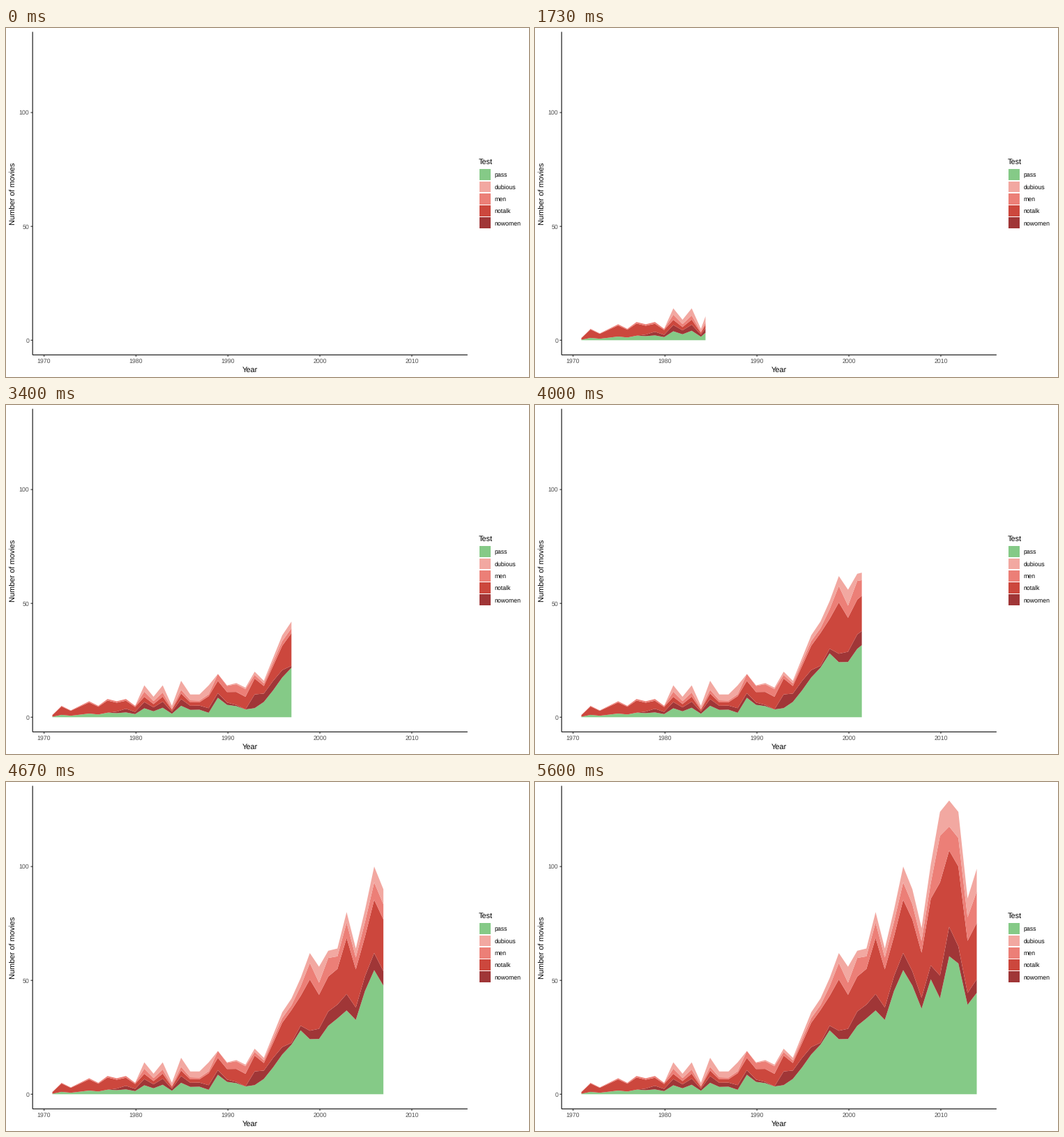
Recreate the animation shown at these times as a matplotlib script. Size 750 by 500 pixels, loop 6670 ms.

```python
import numpy as np
import matplotlib.pyplot as plt
from matplotlib.animation import FuncAnimation
from matplotlib.patches import Polygon, Rectangle

plt.rcParams["font.family"] = "Liberation Sans"
plt.rcParams["text.hinting"] = "none"

W, H, DPI = 750, 500, 100
PX = 72 / DPI                      # points per pixel
STEPS, REVEAL, LOOP = 100, 84, 6670
SUB = 4                            # drawn frames per reveal step

# Panel geometry in pixels
LEFT, RIGHT, TOP, BOTTOM = 38.15, 661.85, 5.5, 468.3
X0, YEAR = 66.5, 13.186            # first data point, width of a year
Y0, UNIT = 447.3, 3.2617           # baseline, height of one movie

COLORS = {"pass": "#85ca87", "dubious": "#f2a8a1", "men": "#ec7f77",
          "notalk": "#cc473d", "nowomen": "#a03637"}
STACK = ["pass", "nowomen", "notalk", "men", "dubious"]

# Movies per year; the bands are shares of it that drift between key years
total = np.array([1, 5, 3, 5, 7, 5, 8, 7, 8, 5, 14, 9, 14, 5, 16, 10, 10, 14,
                  19, 14, 15, 13, 20, 16, 26, 36, 42, 51, 62, 56, 63, 64, 80,
                  64, 81, 100, 90, 73, 101, 124, 129, 124, 86, 99])
years = np.arange(len(total))


def share(*keys):
    return np.interp(years, *zip(*keys))


passing = share((0, .2), (16, .33), (17, .14), (18, .45), (22, .2), (23, .42),
                (27, .55), (28, .39), (31, .52), (32, .46), (34, .56),
                (38, .5), (39, .34), (40, .47), (43, .45))
no_women = share((6, 0), (8, .2), (16, .18), (21, 0), (22, .3), (26, .02),
                 (30, .1), (38, .06), (40, .1), (41, .06))
up_to_notalk = share((0, .95), (9, .9), (10, .64), (17, .66), (18, .84),
                     (21, .69), (22, .85), (26, .88), (29, .78), (31, .86),
                     (38, .85), (39, .75), (40, .83), (43, .76))
up_to_men = share((0, 1), (9, 1), (10, .8), (17, .72), (18, 1), (22, .93),
                  (28, .93), (29, .875), (30, .95), (43, .9))
levels = [0, passing, passing + no_women, up_to_notalk, up_to_men, 1]
edges = [total * level for level in levels]
key_steps = np.round(years * REVEAL / years[-1])

fig = plt.figure(figsize=(W / DPI, H / DPI), dpi=DPI, facecolor="white")
ax = fig.add_axes([0, 0, 1, 1])
ax.set_xlim(0, W)
ax.set_ylim(H, 0)
ax.axis("off")


def text(x, y, s, size=8.8, color="black", **kw):
    ax.text(x, y, s, fontsize=size * PX, color=color, va="baseline", **kw)


def line(xs, ys, color="black"):
    ax.plot(xs, ys, color=color, lw=1.07 * PX, solid_capstyle="butt",
            snap=False, zorder=3)


def draw_axes():
    for i in range(5):
        x = X0 - 11.95 + 10 * YEAR * i
        line([x, x], [BOTTOM, BOTTOM + 2.75], "#333333")
        text(x, 480, str(1970 + 10 * i), color="#4d4d4d", ha="center")
    for n in (0, 50, 100):
        y = Y0 - n * UNIT
        line([LEFT - 2.75, LEFT], [y, y], "#333333")
        text(33.2, y + 3.2, str(n), color="#4d4d4d", ha="right")
    line([LEFT, LEFT], [TOP, BOTTOM])
    line([LEFT, RIGHT], [BOTTOM, BOTTOM])
    text(350, 493, "Year", 11, ha="center")
    text(14, (TOP + BOTTOM) / 2, "Number of movies", 11, ha="center",
         rotation=90, rotation_mode="anchor")


def draw_legend():
    text(678, 195, "Test", 11)
    for i, (name, color) in enumerate(COLORS.items()):
        y = 210.2 + 17.28 * i
        ax.add_patch(Rectangle((679, y - 7.95), 16, 15.9, fc=color, lw=0))
        text(700.8, y + 3.3, name)


draw_axes()
draw_legend()
bands = [ax.add_patch(Polygon(np.zeros((3, 2)), fc=COLORS[n], lw=0, zorder=2))
         for n in STACK]


def update(frame):
    step = (frame + 1) // SUB
    now = np.interp(step, key_steps, years)
    t = np.append(years[years < now], now)
    x = X0 + t * YEAR
    ys = [Y0 - UNIT * np.interp(t, years, e) for e in edges]
    for band, low, high in zip(bands, ys, ys[1:]):
        band.set_visible(step > 0)
        band.set_xy(np.column_stack([np.append(x, x[::-1]),
                                     np.append(high, low[::-1])]))
    return bands


anim = FuncAnimation(fig, update, frames=STEPS * SUB,
                     interval=LOOP / (STEPS * SUB),
                     init_func=lambda: update(0), repeat=True, repeat_delay=0)
plt.show()
```
